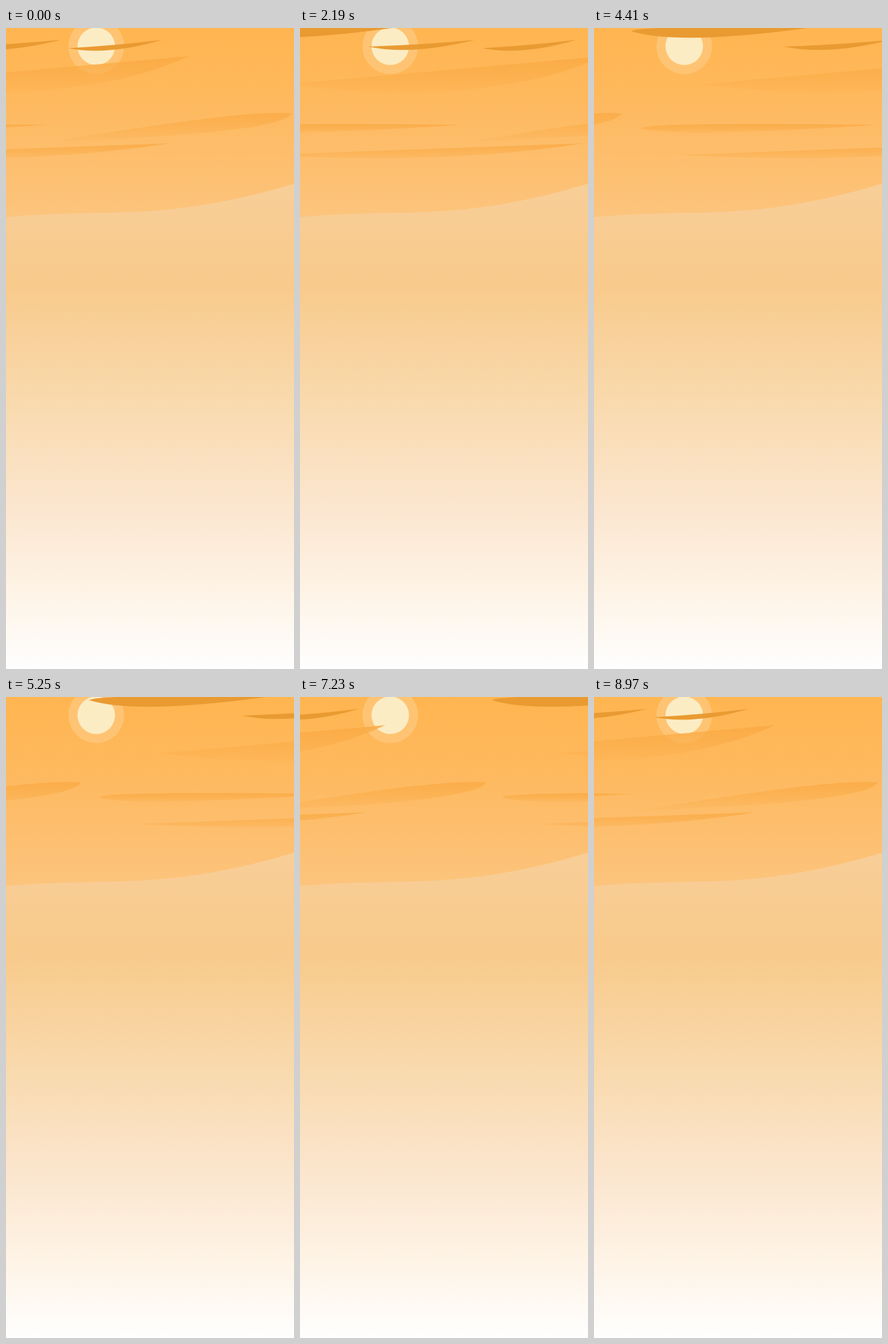
Animation of 450x1000 px, one loop 9 s. Source, as an HTML page with a canvas:

```html
<!DOCTYPE html>
<html lang="en">
<head>
<meta charset="utf-8">
<title>Drifting clouds at dusk</title>
<style>
  html, body { margin: 0; width: 100%; height: 100%; overflow: hidden; background: #fefefe; }
  canvas { display: block; width: 100vw; height: 100vh; }
</style>
</head>
<body>
<canvas id="stage" width="450" height="1000"></canvas>
<script>
const ctx = document.getElementById('stage').getContext('2d');
const W = 450, H = 1000, LOOP = 9000, STEP = 30;
const SPAN = 771.4; // distance a cloud drifts in one loop
const DARK = '#e99b32';

// Vertical gradient from [y, colour] pairs.
function gradient(...stops) {
  const y0 = stops[0][0], y1 = stops[stops.length - 1][0];
  const g = ctx.createLinearGradient(0, y0, 0, y1);
  for (const [y, color] of stops) g.addColorStop((y - y0) / (y1 - y0), color);
  return g;
}

const haze = (top, bottom) =>
  gradient([top, 'rgba(250,170,68,0.9)'], [bottom, 'rgba(250,170,68,0.1)']);

// A cloud is a leaf: one curve along the top, one back along the belly.
const cloud = (fill, outline, span = SPAN) => ({ fill, span, path: new Path2D(outline) });

const clouds = [
  cloud(haze(43, 104), 'M-213 88 Q36 66 285 44 Q110 126 -213 88'),
  cloud(haze(126, 178), 'M75 177 Q380 126 446 133.5 Q430 164 75 177', 790),
  cloud(haze(149, 166), 'M-303 157 Q-315 147 65 151 Q-250 172 -303 157'),
  cloud(haze(178, 209), 'M-245 198 Q5 189 255 180 Q40 214 -245 198'),
  cloud(DARK, 'M-81 29 Q2 26.4 86 18.5 Q-15 43.5 -81 29'),
  cloud(DARK, 'M97 31.5 Q170 27.5 244 18.5 Q160 43.5 97 31.5'),
  cloud(DARK, 'M-320 5 Q-310 -4 -36 -1 Q-245 28 -320 5')
];

const sky = gradient([0, '#ffb550'], [120, '#feb95f'], [295, '#fcc47d']);
const ground = gradient(
  [240, '#f8ce98'], [400, '#f8ca8b'], [600, '#f9dbb1'],
  [750, '#fbe6cf'], [885, '#fef4e7'], [H, '#fefefe']);
const hill = new Path2D(`M0 295 C160 280 240 305 ${W} 243 V${H} H0 Z`);

function disc(x, y, r, color) {
  ctx.fillStyle = color;
  ctx.beginPath();
  ctx.arc(x, y, r, 0, Math.PI * 2);
  ctx.fill();
}

function drawCloud({ fill, span, path }, phase) {
  ctx.fillStyle = fill;
  for (const turn of [phase, phase - 1]) {
    ctx.save();
    ctx.translate(turn * span, 0);
    ctx.fill(path);
    ctx.restore();
  }
}

function draw(ms) {
  const phase = Math.floor((ms % LOOP) / STEP) * STEP / LOOP;
  ctx.fillStyle = sky;
  ctx.fillRect(0, 0, W, H);
  disc(141, 28.5, 43.5, '#fec473');
  disc(141, 28.5, 29.3, '#fcecc4');
  for (const c of clouds) drawCloud(c, phase);
  ctx.fillStyle = ground;
  ctx.fill(hill);
}

const start = performance.now();
function tick() {
  draw(performance.now() - start);
  requestAnimationFrame(tick);
}
tick();
</script>
</body>
</html>
```
